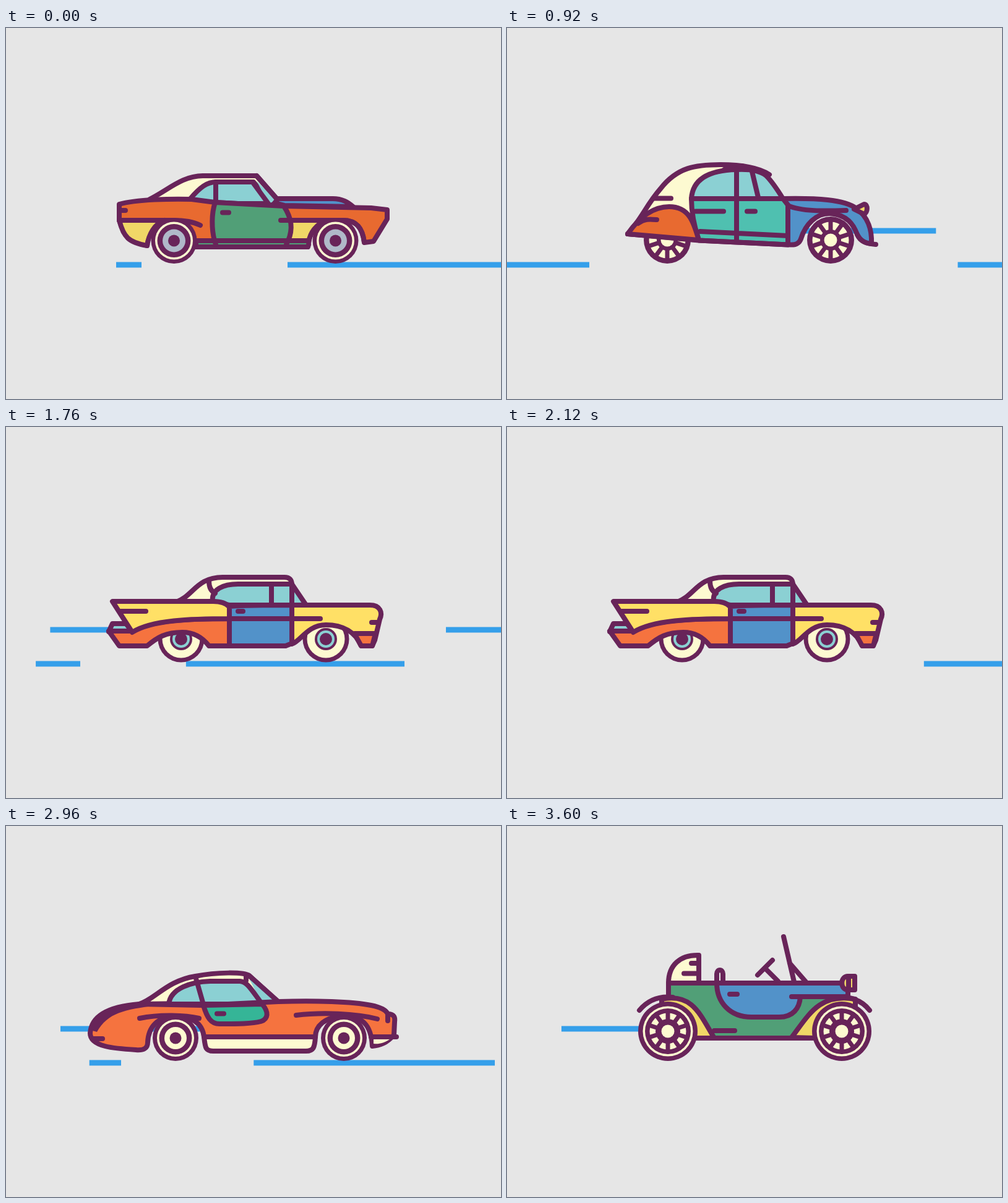
Recreate the animation shown at these times as an HTML page with a canvas. Size 800 by 600 pixels, loop 3.64 s.

```html
<!DOCTYPE html>
<html lang="en">
<head>
<meta charset="utf-8">
<title>Cars</title>
<style>
html, body { margin: 0; height: 100%; overflow: hidden; background: #e6e6e6; }
canvas { display: block; }
</style>
</head>
<body>
<canvas id="stage" width="800" height="600"></canvas>
<script>
const ctx = document.getElementById('stage').getContext('2d');
const BG = '#e6e6e6', INK = '#682459', ROAD = '#359fea';
const CREAM = '#fdfad1', ORANGE = '#e86a30', CORAL = '#f5733f', RED = '#f4673a';
const GREEN = '#519f77', TEAL = '#4fc0b0', GLASS = '#8bd0d3', ICE = '#d7ebf1';
const BLUE = '#5292c9', GOLD = '#f0d767', YELLOW = '#ffe066', STEEL = '#b0b9c9', JADE = '#35b597';

const fill = (color, d) => { ctx.fillStyle = color; ctx.fill(new Path2D(d)); };
const line = (d, width = 8) => { ctx.lineWidth = width; ctx.stroke(new Path2D(d)); };
const shape = (color, d) => { fill(color, d); line(d); };

// Concentric discs, given as radius, colour pairs
function wheel(x, y, ...discs) {
  for (let i = 0; i < discs.length; i += 2) {
    ctx.fillStyle = discs[i + 1];
    ctx.beginPath();
    ctx.arc(x, y, discs[i], 0, 7);
    ctx.fill();
  }
}

function spokes(x, y, count, r0, r1, width) {
  ctx.lineWidth = width;
  for (let i = 0; i < count; i++) {
    const a = i / count * Math.PI * 2 - Math.PI / 2;
    ctx.beginPath();
    ctx.moveTo(x + r0 * Math.cos(a), y + r0 * Math.sin(a));
    ctx.lineTo(x + r1 * Math.cos(a), y + r1 * Math.sin(a));
    ctx.stroke();
  }
}

function muscle() {
  shape(CREAM, 'M232 277C262 262 285 239 318 239H405L440 279L430 285H300Z');
  shape(GLASS, 'M297 277C314 257 325 249 340 249H400L430 284H339Z');
  fill(GLASS, 'M405 247L437 279L424 284Z');
  line('M339 249V282M399 250L424 284M405 239L440 279');
  shape(BLUE, 'M434 283L440 276H528C544 276 553 282 561 289L450 287Z');
  shape(ORANGE, 'M183 285C210 277 270 276 300 277L338 282L449 288L590 291L616 294V309L594 345L579 347C576 324 567 311 545 311H510L489 344H307L235 340L190 330L183 311Z');
  shape(GOLD, 'M183 311H256C240 318 231 335 228 352C198 347 190 338 183 311Z');
  fill(GOLD, 'M456 311H515C498 320 490 334 488 344H455Z');
  shape(GREEN, 'M307 344H491L488 354H307Z');
  shape(GREEN, 'M338 282L449 288C462 308 464 325 456 344H337C332 325 332 300 338 282Z');
  line('M337 344L339 350M456 344L453 350');
  fill(BG, 'M232 350C234 330 242 318 256 313L275 311V350ZM493 350C495 330 505 315 530 313C560 313 573 330 574 345Z');
  line('M183 311H270C292 311 304 314 314 319M444 311H545C565 311 576 322 579 346M228 352C231 333 240 317 256 311M489 346C492 331 500 319 516 312');
  line('M186 295H193M350 298.5H360');
  for (const x of [271.5, 532.5]) wheel(x, 344, 37, INK, 30.5, CREAM, 27, INK, 18.5, STEEL, 9.5, INK);
}

function spokedWheel(x) {
  wheel(x, 343, 38, INK, 29.5, CREAM, 17, INK, 10.5, CREAM);
  spokes(x, 343, 10, 16, 32, 7);
}

function snail() {
  spokedWheel(259);
  shape(CREAM, 'M195 333C216 311 226 285 248 260C275 225 305 221 345 221C385 221 410 228 424 237L400 233L330 240L300 280L310 340Z');
  shape(GLASS, 'M298 276C300 245 325 230 371 229C392 228 408 230 419 239C430 250 438 263 446 276Z');
  fill(INK, 'M350 225L380 219L425 235L415 238L380 229L340 232Z');
  shape(TEAL, 'M298 276H447L454 286V350.5L310 343.5C303 322 298 300 298 276Z');
  shape(BLUE, 'M446 276C500 275 545 277 565 292C584 306 590 328 589 349C578 348 571 344 566 334C560 318 550 302 522 300C500 299 482 318 475 341C472 349 466 352 454 350V286Z');
  line('M454 287C475 297 515 296 548 295M566 334C571 345 580 349 596 350');
  line('M371 228V345M396 232L406 274M312 329L454 336M298 276H447M195 333L310 343.5L454 350.5');
  line('M305 296.5H350M388 296.5H401M238 275.5H265');
  shape(ORANGE, 'M195 333C218 300 240 289 262 289C295 289 302 315 310 343Z');
  line('M212 316C222 308 231 309 242 310');
  shape(GOLD, 'M561 293L577 285C584 285 583 299 577 301Z');
  spokedWheel(523);
}

function wedge() {
  fill(ICE, 'M240 283L308 264L313 298Z');
  ctx.lineJoin = 'miter';
  shape(GREEN, 'M152 304L240 283C275 284 300 290 313 298C320 320 330 335 345 349H320L330 368H291V345C291 318 272 299 246 299C219 299 200 318 200 345V363C175 357 158 338 152 304Z');
  shape(TEAL, 'M320 349L446 345V300L462 295C500 286 530 285 555 291C580 297 615 316 634 327C642 332 639 342 630 347C610 361 595 366 573 363V345C573 318 554 299 528 299C500 299 482 318 482 345V368H330Z');
  ctx.lineJoin = 'round';
  shape(RED, 'M308 264C314 300 325 330 345 349H446V308C446 301 443 298 438 298H340L316 264Z');
  shape(ICE, 'M319 266C340 263 360 265 377 264L415 297H340C328 287 323 277 319 266Z');
  shape(ICE, 'M377 262L462 294L412 297Z');
  fill(BLUE, 'M577 351H626C612 360 595 363 577 360Z');
  line('M152 304L310 263C335 257 355 257 380 259L462 294');
  line('M187 310C205 303 225 298 246 298');
  line('M343 316H355M381 329H460M320 349H469M573 349H631M159 310.5H171M469 317C482 308 495 305 512 301');
  for (const x of [246, 528]) {
    wheel(x, 345, 36.5, INK, 29.5, CREAM, 26.5, INK, 21, CREAM, 9, INK);
    spokes(x, 345, 5, 4, 22, 8);
  }
}

function finned() {
  for (const x of [283, 517]) wheel(x, 343, 37.5, INK, 30.5, CREAM, 18, INK, 14, GLASS, 10, INK);
  shape(CREAM, 'M275 283C302 274 308 243 350 243H450C458 243 462 247 462 256V290H330Z');
  shape(GLASS, 'M334 283C331 262 352 254 375 254H462L485 288H361Z');
  line('M328 249C328 260 332 266 338 269M429 254V288M462 254V290');
  shape(GLASS, 'M172 318H194L204 331H166Z');
  shape(CORAL, 'M166 330H202C235 312 300 310 361 310V354H328C318 341 305 332 285 332C258 332 245 340 228 354H183Z');
  shape(YELLOW, 'M172 282H335C347 282 355 284 361 291V310C300 310 235 312 204 332Z');
  shape(BLUE, 'M361 290C390 288 430 288 462 288V350L452 354H361Z');
  shape(YELLOW, 'M462 288H588C605 288 609 300 604 311L596 345L592 354H574C565 332 545 320 517 320C487 320 476 347 462 351Z');
  shape(CORAL, 'M563 334H597L592 354H574Z');
  line('M361 310H508M186 298H226M375 298H383M591 316H600');
}

function gullwing() {
  shape(CREAM, 'M215 288C240 281 260 250 306 243C340 236 385 236 393 242L440 285Z');
  fill(GLASS, 'M391 243L440 284L414 288Z');
  shape(GLASS, 'M263 288C266 262 300 252 330 251H378C390 252 396 264 414 288Z');
  line('M393 242L440 284');
  shape(CORAL, 'M136 335C138 308 165 292 215 288L318 290L440 284C500 282 560 284 590 290C605 293 614 297 617 304C628 304 629 310 628 317L627 338C615 351 605 355 592 356C590 320 575 308 546 308C515 308 500 324 500 341H320C317 318 300 308 274 308C245 308 230 325 229 350C229 360 222 363 210 362C175 360 136 357 136 335Z');
  shape(CREAM, 'M320 341H500C499 358 497 364 485 364H335C322 364 322 358 320 341Z');
  fill(CREAM, 'M594 345H620C611 351 603 353 594 352Z');
  fill(INK, 'M136 330C142 305 165 289 215 286L245 290C190 297 165 302 147 333Z');
  shape(JADE, 'M319 290L414 288C425 301 424 312 412 316C398 320 375 320 345 320C331 320 325 310 319 290Z');
  line('M306 243L320 292M388 242V250');
  line('M216 311C250 304 290 306 312 311M469 306C510 301 565 303 600 312M617 304V315M590 341H631M142 344H156M341 303.5H352');
  for (const x of [274, 546]) wheel(x, 343, 37, INK, 30, CREAM, 26.5, INK, 18, CREAM, 9.5, INK);
}

function buggy() {
  fill(GREEN, 'M261 254H551V285L497 343H305L261 290Z');
  fill(CREAM, 'M261 254C261 225 280 208 310 209V254Z');
  line('M261 272V254C261 225 280 208 310 209V252M298 222H308M286 238.5H308');
  shape(BLUE, 'M339 254H551V276H474C473 295 462 309 440 309H395C360 309 339 285 339 254Z');
  shape(GOLD, 'M250 280C300 270 312 305 335 343H300L250 300Z');
  shape(GOLD, 'M563 280C505 270 488 305 460 342L500 343L563 300Z');
  line('M214 298C230 279 250 275 268 277M586 298C573 281 552 275 533 277');
  line('M261 254H545M300 343H500M460 276H551M335 331H368M360 272H372');
  line('M339 254V239A5 6 0 0 1 349 239V254M405 241L429 217M417 230L438 251M447 179L464 252M457 222L483 252');
  line('M551 262V276');
  shape(GOLD, 'M562 243V265H551C538 265 538 243 551 243Z');
  line('M552 243V265');
  for (const x of [260, 541]) {
    wheel(x, 332, 48, INK, 40.5, CREAM, 37, INK, 29.5, CREAM, 20, INK, 10.5, CREAM);
    spokes(x, 332, 10, 17, 33, 7);
  }
}

const FRAME = 40, FRAMES = 91;
const cars = [muscle, snail, wedge, finned, gullwing, buggy];
const cuts = [0, 13, 30, 43, 59, 75];
// Each pass of road lines: start frame and speed of the upper line's head
const passes = [[0, 55.6], [13, 41.4], [28, 49.2], [41, 41.1], [57, 44.5], [73, 44.5]];

function dash(left, right, y) {
  if (right > left) ctx.fillRect(left, y, right - left, 9);
}

function road(frame) {
  ctx.fillStyle = ROAD;
  for (const [start, speed] of passes) {
    const u = frame - start;
    dash(711 - speed * (u - 3), 639 - 54.3 * (u - 11), 323.5);
    dash(178 - 43.3 * u, 219 - 33 * u, 378.5);
    if (u > -8) dash(455 - 54.7 * u, 863 - 73 * u, 378.5);
  }
}

function draw(now) {
  const frame = Math.floor(now / FRAME) % FRAMES;
  ctx.fillStyle = BG;
  ctx.fillRect(0, 0, 800, 600);
  road(frame);
  ctx.strokeStyle = INK;
  ctx.lineCap = ctx.lineJoin = 'round';
  cars[cuts.filter(cut => cut <= frame).length - 1]();
  requestAnimationFrame(draw);
}
requestAnimationFrame(draw);
</script>
</body>
</html>
```
